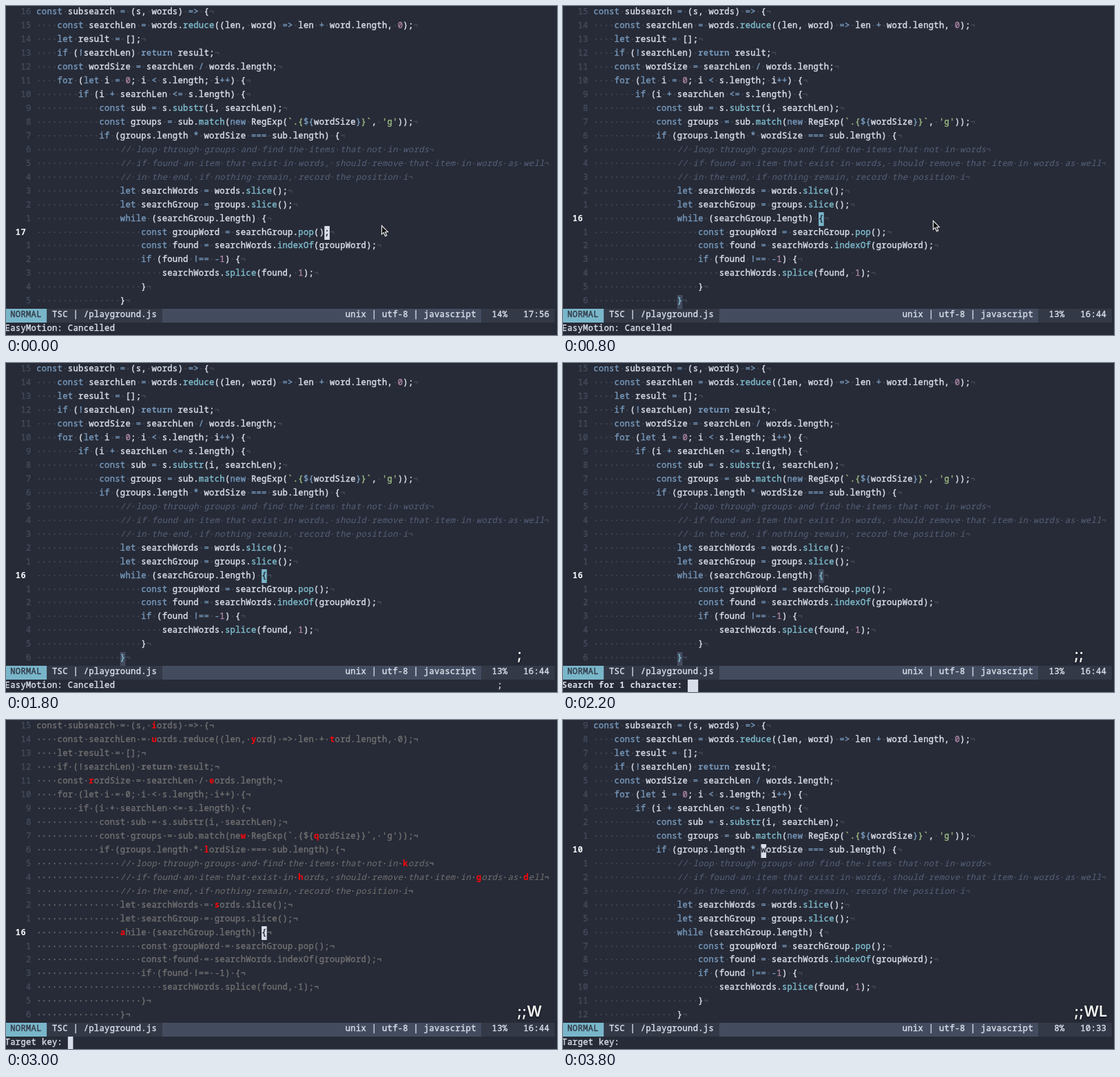
An HTML page with a canvas that plays this animation: 800 by 477 pixels, repeating every 4 s.

```html
<!DOCTYPE html>
<html lang="en">
<head>
<meta charset="utf-8">
<title>Editor jump</title>
<style>
html, body { margin: 0; width: 100%; height: 100%; overflow: hidden; background: #272b37; }
canvas { display: block; width: 800px; height: 477px; }
</style>
</head>
<body>
<canvas id="stage" width="800" height="477"></canvas>
<script>
const ctx = document.getElementById('stage').getContext('2d');

const LOOP = 4000;
const CELL = 7.602, LEFT = -1.4, PITCH = 19.95, TOP = 0, BASE = 12.3;
const TEXT_COL = 6, STATUS_ROW = 22, PROMPT_ROW = 23;
const MONO = '12.2px "Noto Sans Mono", "DejaVu Sans Mono", monospace';

const C = {
  bg: '#272b37', panel: '#333947', bar: '#434c5f', faint: '#434b5c',
  text: '#d9dfea', bright: '#f4f6fa', keyword: '#7698bb', call: '#7fbccd',
  comment: '#56617a', number: '#ab84a6', string: '#9cba84',
  accent: '#79b6ca', shade: '#707070', label: '#fb0509'
};

const code = `const subsearch = (s, words) => {
    const searchLen = words.reduce((len, word) => len + word.length, 0);
    let result = [];
    if (!searchLen) return result;
    const wordSize = searchLen / words.length;
    for (let i = 0; i < s.length; i++) {
        if (i + searchLen <= s.length) {
            const sub = s.substr(i, searchLen);
            const groups = sub.match(new RegExp(\`.{\${wordSize}}\`, 'g'));
            if (groups.length * wordSize === sub.length) {
                // loop through groups and find the items that not in words
                // if found an item that exist in words, should remove that item in words as well
                // in the end, if nothing remain, record the position i
                let searchWords = words.slice();
                let searchGroup = groups.slice();
                while (searchGroup.length) {
                    const groupWord = searchGroup.pop();
                    const found = searchWords.indexOf(groupWord);
                    if (found !== -1) {
                        searchWords.splice(found, 1);
                    }
                }`.split('\n');

const rules = [
  [/\/\/.*/y, 'comment', 'italic 500 '],
  [/return\b/y, 'keyword', 'bold '],
  [/(const|let|if|for|while|new)\b/y, 'keyword'],
  [/`\.\{|\}`|'g'/y, 'string'],
  [/\$\{|\}(?=\}`)/y, 'keyword'],
  [/(reduce|substr|match|slice|pop|indexOf|splice)(?=\()/y, 'call'],
  [/\w+/y, 'text'],
  [/[=<>+\-*\/!]+/y, 'keyword'],
  [/./y, 'text']
];

// Turns a line into one { ch, color, weight } per cell.
function paintLine(line) {
  const cells = [];
  let pos = 0;
  while (pos < line.length) {
    for (const [re, kind, weight = '500 '] of rules) {
      re.lastIndex = pos;
      const hit = re.exec(line);
      if (!hit) continue;
      const name = /^\d+$/.test(hit[0]) ? 'number' : kind;
      for (const ch of hit[0]) {
        cells.push(ch === ' ' ? { ch: '·', color: C.faint, weight: '500 ' }
                              : { ch, color: C[name], weight });
      }
      pos += hit[0].length;
      break;
    }
  }
  cells.push({ ch: '¬', color: C.faint, weight: '500 ' });
  return cells;
}

const lines = code.map(paintLine);
const labels = 'iuytrewqlkhgdsa';

const lastLine = { cur: 16, col: 55, percent: '14%', place: '17:56' };
const loopLine = { cur: 15, col: 43, percent: '13%', place: '16:44' };
const jumpLine = { cur: 9, col: 32, percent: '8%', place: '10:33' };
const cancelled = 'EasyMotion: Cancelled';
const search = 'Search for 1 character: ';

const scenes = [
  { at: 0, ...lastLine, prompt: cancelled, mouse: [545, 318] },
  { at: 200, ...loopLine, pair: true, prompt: cancelled, mouse: [545, 318] },
  { at: 400, ...loopLine, pair: true, prompt: cancelled, mouse: [537, 311] },
  { at: 1000, ...loopLine, pair: true, prompt: cancelled },
  { at: 1800, ...loopLine, pair: true, prompt: cancelled, pending: ';', keys: ';' },
  { at: 2000, ...loopLine, pair: true, prompt: search, wait: 2, keys: ';;' },
  { at: 2800, ...loopLine, pair: true, prompt: search, wait: 2, keys: ';;W' },
  { at: 3000, ...loopLine, hints: true, prompt: 'Target key: ', wait: 1, keys: ';;W' },
  { at: 3800, ...jumpLine, prompt: 'Target key: ', keys: ';;WL' }
];

const xAt = col => LEFT + col * CELL;
const topOf = row => Math.round(TOP + row * PITCH);

function block(row, col, count, color) {
  ctx.fillStyle = color;
  ctx.fillRect(xAt(col), topOf(row), count * CELL, topOf(row + 1) - topOf(row));
}

// A hairline stroke gives the plain weight its slightly heavier look.
function put(row, col, str, color, weight = '500 ') {
  const y = Math.round(BASE + row * PITCH);
  ctx.font = weight + MONO;
  ctx.fillStyle = ctx.strokeStyle = color;
  ctx.lineWidth = 0.4;
  [...str].forEach((ch, i) => {
    ctx.fillText(ch, xAt(col + i), y);
    if (weight === '500 ') ctx.strokeText(ch, xAt(col + i), y);
  });
}

function drawCode(s) {
  let used = 0;
  lines.forEach((cells, row) => {
    if (row === s.cur) put(row, 2, String(row + 1), C.bright, 'bold ');
    else put(row, 3, String(Math.abs(row - s.cur)).padStart(2), C.faint);

    cells.forEach(({ ch, color, weight }, i) => {
      const col = TEXT_COL + i;
      if (s.hints) {
        color = C.shade;
        if (ch === 'w') {
          ch = labels[used++];
          color = C.label;
          weight = 'bold ';
        }
      }
      const here = row === s.cur && i === s.col;
      const mate = s.pair && row === lines.length - 1 && ch === '}';
      if (mate || (here && s.pair && s.wait)) {
        block(row, col, 1, C.bar);
        color = C.call;
      } else if (here) {
        block(row, col, 1, s.pair ? C.accent : C.text);
        color = C.bg;
      }
      put(row, col, ch, color, weight);
    });
  });
}

function drawStatus(s) {
  block(STATUS_ROW, 0, 8, C.accent);
  block(STATUS_ROW, 8, 22, C.panel);
  block(STATUS_ROW, 30, 61, C.bar);
  block(STATUS_ROW, 91, 14, C.panel);
  put(STATUS_ROW, 1, 'NORMAL', C.panel);
  put(STATUS_ROW, 9, 'TSC | /playground.js', C.text);
  put(STATUS_ROW, 65, 'unix | utf-8 | javascript', C.text);
  put(STATUS_ROW, 93, s.percent.padStart(3), C.text);
  put(STATUS_ROW, 99, s.place, C.text);

  put(PROMPT_ROW, 0, s.prompt, C.text, s.prompt === search ? 'bold ' : '500 ');
  if (s.wait) block(PROMPT_ROW, s.prompt.length, s.wait, C.text);
  if (s.pending) put(PROMPT_ROW, 94, s.pending, C.text);
}

function drawKeys(keys) {
  ctx.save();
  ctx.font = '600 21.5px Inter, "Liberation Sans", sans-serif';
  ctx.shadowColor = 'rgba(0,0,0,.7)';
  ctx.shadowBlur = 3;
  ctx.shadowOffsetY = 1;
  ctx.fillStyle = '#f5f5f5';
  ctx.fillText(keys, 742, 430);
  ctx.restore();
}

function drawMouse([x, y]) {
  ctx.save();
  ctx.translate(x, y);
  ctx.beginPath();
  [[0.5, 0.5], [0.5, 13], [3.4, 10.4], [5.6, 15.6], [7.8, 14.6], [5.6, 9.6], [9.4, 9.4]]
    .forEach(p => ctx.lineTo(...p));
  ctx.closePath();
  ctx.fillStyle = '#0b0b0d';
  ctx.fill();
  ctx.strokeStyle = '#e8e8ea';
  ctx.lineWidth = 1.2;
  ctx.stroke();
  ctx.restore();
}

function draw(s) {
  ctx.fillStyle = C.bg;
  ctx.fillRect(0, 0, 800, 477);
  drawCode(s);
  drawStatus(s);
  if (s.keys) drawKeys(s.keys);
  if (s.mouse) drawMouse(s.mouse);
}

const start = performance.now();
let shown = null;

function tick() {
  const t = Math.max(0, performance.now() - start) % LOOP;
  const scene = scenes.filter(s => s.at <= t).pop();
  if (scene !== shown) draw(shown = scene);
  requestAnimationFrame(tick);
}
tick();
</script>
</body>
</html>
```
